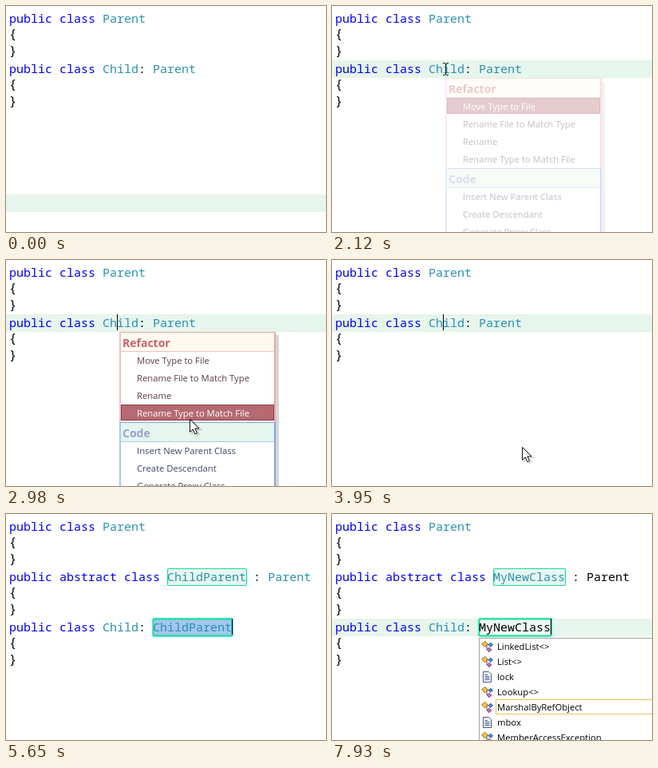
An HTML page that plays this animation: 401x283 px, repeating every 8 s.

```html
<!DOCTYPE html>
<html lang="en">
<head>
<meta charset="utf-8">
<title>Rename after refactoring</title>
<style>
  html, body { margin: 0; width: 100%; height: 100%; overflow: hidden; background: #fff; }
  svg { display: block; width: 401px; height: 283px; }
  text { white-space: pre; }
  .code { font: 15px "Noto Sans Mono", "DejaVu Sans Mono", monospace; }
  .brace { font: 500 15.5px "Noto Sans Mono", "DejaVu Sans Mono", monospace; }
  .ui { font: 11.25px "Open Sans", "Noto Sans", sans-serif; }
  .head { font: bold 14px "Open Sans", "Noto Sans", sans-serif; }
</style>
</head>
<body>
<svg id="stage" viewBox="0 0 401 283"></svg>
<script>
const LOOP = 8000, STEP = 60, LINE = 21, CHAR = 9, LEFT = 4;
const KEYWORD = '#0000f0', TYPE = '#2b91af', GREEN = '#14dca0';
const BAND = '#e6f5ed', BAND_EDGE = '#e4f6e2';
const stage = document.getElementById('stage');

// Helpers
const rect = (x, y, w, h, fill, more = '') =>
  `<rect x="${x}" y="${y}" width="${w}" height="${h}" fill="${fill}" ${more}/>`;
const label = (cls, x, y, fill, str) =>
  `<text class="${cls}" x="${x}" y="${y}" fill="${fill}">${str}</text>`;
const path = (d, more) => `<path d="${d}" ${more}/>`;
const at = (x, y, body) => `<g transform="translate(${x} ${y})">${body}</g>`;
const span = (fill, str) => `<tspan fill="${fill}">${str}</tspan>`;
const within = (t, a, b) => t >= a && t < b;
const snap = (t, start) => start + Math.floor((t - start) / STEP) * STEP;

// Keywords are coloured by word, type names are written in backticks.
function codeLine(row, str) {
  const marked = str
    .replace(/\b(public|abstract|class)\b/g, span(KEYWORD, '$1'))
    .replace(/`(\w+)`/g, span(TYPE, '$1'));
  return label('code', LEFT, LINE * (row + 1), '#000', marked);
}

// A class declaration with its empty body
const classBlock = (row, str) => codeLine(row, str) +
  ['{', '}'].map((c, i) => label('brace', LEFT, LINE * (row + i + 2) - 1, '#000', c)).join('');

function band(row) {
  const y = 5 + LINE * row;
  return rect(0, y, 401, 22, BAND_EDGE) + rect(0, y + 1, 401, 20, BAND);
}
const caret = (x, row) => rect(x, 5 + LINE * row, 1, 20, '#000');

// Position on a list of [time, x, y] points
function follow(points, t) {
  const i = points.findIndex(p => p[0] > t);
  if (i < 0) return points[points.length - 1].slice(1);
  if (i === 0) return points[0].slice(1);
  const a = points[i - 1], b = points[i];
  const k = (t - a[0]) / (b[0] - a[0]);
  return [1, 2].map(n => Math.round(a[n] + (b[n] - a[n]) * k));
}

// Mouse
const ARROW = 'M.5 .5V16.5L4.3 12.9L6.8 18.8L9.4 17.7L6.9 12H12z';
const arrow = (x, y) => at(x, y,
  at(2.5, 1.5, path(ARROW, 'fill="#000" opacity=".13" stroke="#000" stroke-width="2"')) +
  path(ARROW, 'fill="#fff" stroke="#111"'));
const beam = (x, y) => at(x, y, path('M-3 -7.5H-1L.5 -6.5L2 -7.5H4M.5 -7V7M-3 7.5H-1L.5 6.5L2 7.5H4',
  'fill="none" stroke="#111"'));

const APPROACH = [[400, 300, 246], [700, 238, 168], [940, 158, 92], [1060, 142, 79]];
const PICK = [[2380, 142, 79], [2620, 219, 140], [2920, 228, 190], [3220, 238, 233], [3290, 238, 234]];
const pickPoint = t => follow(PICK, t >= 3290 ? t : snap(t, 2440));

function mouse(t) {
  if (t < 460 || t >= 4210) return '';
  if (t < 1120) return beam(...follow(APPROACH, snap(t, 460)));
  const [x, y] = pickPoint(t);
  return y > 90 ? arrow(x, y) : beam(x, y);
}

// Refactoring menu
const SECTIONS = [
  { title: 'Refactor', top: 90, height: 114, line: '#f2c2be', side: '#e8a8a6', bar: '#fffaf0',
    head: '#c96466', ink: '#5c3c40', hot: '#b56a71', edge: '#8a3c48',
    items: ['Move Type to File', 'Rename File to Match Type', 'Rename', 'Rename Type to Match File'] },
  { title: 'Code', top: 203, height: 114, line: '#a8c8f0', side: '#86a4e0', bar: '#e6f5ed',
    head: '#93a4d2', ink: '#3e4866', hot: '#6f8fc8', edge: '#3f5c98',
    items: ['Insert New Parent Class', 'Create Descendant', 'Generate Proxy Class'] }
];

function menu(t) {
  if (!within(t, 2120, 3950)) return '';
  const y = pickPoint(t)[1];
  const rows = SECTIONS.flatMap(s => s.items.map((name, i) => ({ s, name, top: s.top + 25 + 22 * i })));
  const hot = rows.filter(r => r.top <= y).pop() || rows[0];
  let out = rect(146, 94, 196, 200, '#000', 'opacity=".16"');
  for (const s of SECTIONS) {
    out += rect(142, s.top, 196, s.height, '#fff') +
      rect(144, s.top + 1, 192, 23, s.bar) +
      rect(142, s.top, 196, 1, s.side) +
      rect(142, s.top, 2, s.height, s.line) +
      rect(336, s.top, 2, s.height, s.side) +
      rect(144, s.top + 24, 192, 1, s.line) +
      label('head', 146, s.top + 19, s.head, s.title);
  }
  for (const r of rows) {
    if (r === hot) out += rect(144.5, r.top + .5, 191, 19, r.s.hot, `stroke="${r.s.edge}"`);
    out += label('ui', 164, r.top + 15, r === hot ? '#fff' : r.s.ink, r.name);
  }
  const fade = Math.min(1, (1 + Math.floor((t - 2120) / STEP)) / 3);
  return `<g opacity="${fade}">${out}</g>`;
}

// Completion list
const diamond = (x, y, r, fill, edge) =>
  path(`M${x - r} ${y}L${x} ${y - r}L${x + r} ${y}L${x} ${y + r}z`, `fill="${fill}" stroke="${edge}"`);
const classIcon = path('M6 5.5H11M7 6V11.5H9', 'fill="none" stroke="#444"') +
  diamond(4.5, 5, 3.8, '#f4c444', '#9a6a10') +
  diamond(11.8, 5.8, 2.6, '#4c8cec', '#1c489c') +
  diamond(10, 12, 2.7, '#d070c8', '#802c80');
const pageIcon = path('M2.5 1.5H9.5L12.5 4.5V14.5H2.5z', 'fill="#f4f8ff" stroke="#4c5c74"') +
  path('M4.5 5.5H8M4.5 7.5H10.5M4.5 9.5H10.5M4.5 11.5H10.5', 'fill="none" stroke="#3c5c94"');
const WORDS = ['LinkedList&lt;&gt;', 'List&lt;&gt;', 'lock', 'Lookup&lt;&gt;',
  'MarshalByRefObject', 'mbox', 'MemberAccessException'];

function completion() {
  let out = rect(184.5, 155.5, 240, 140, '#fff', 'stroke="#a0a0a0"');
  WORDS.forEach((word, i) => {
    const mid = 166 + 19 * i;
    const icon = /^[a-z]/.test(word) ? pageIcon : classIcon;
    out += at(187, mid - 8, icon) + label('ui', 207, mid + 4, '#000', word);
  });
  return out + rect(205.5, 232.5, 220, 18, 'none', 'stroke="#e8c060"');
}

// Linked name fields
function field(x, row, length, active, fill) {
  const box = (paint, width, opacity) =>
    rect(x + .5, 5.5 + LINE * row, length * CHAR, 21, paint,
      `rx="1.5" stroke="${GREEN}" stroke-width="${width}" stroke-opacity="${opacity}"`);
  return (active ? box('none', 4, .3) : '') + box(fill, active ? 1.8 : 1.2, 1);
}

// Time at which each letter is typed
const TYPED = [6450, 6510, 6700, 6960, 7020, 7220, 7680, 7740, 7870, 7930];
const NEW_NAME = 'MyNewClass';

function before(t) {
  const row = t < 1120 ? 11 : 3;
  const on = within(t, 1120, 2120) || within(t, 2690, 3220) || t >= 3750;
  return band(row) + classBlock(3, 'public class `Child`: `Parent`') + (on ? caret(139, 3) : '');
}

function after(t) {
  const count = TYPED.filter(time => time <= t).length;
  const typing = count > 0;
  const name = typing ? NEW_NAME.slice(0, count) : 'ChildParent';
  const base = typing ? 'Parent' : '`Parent`';
  const used = t < 7220 ? '`' + name + '`' : name;
  const linked = t >= 4330;
  let out = linked && !typing ? '' : band(6);
  if (linked)
    out += field(202, 3, name.length, false, '#e8f6ef') +
      field(184, 6, name.length, true, typing ? '#eef8f3' : '#a3c6ee');
  out += classBlock(3, 'public abstract class `' + name + '` : ' + base) +
    classBlock(6, 'public class `Child`: ' + used);
  if (linked && !within(t, 5120, 5650)) out += caret(184 + name.length * CHAR, 6);
  return out + (t >= 6510 ? completion() : '');
}

let shown = '';
function draw(t) {
  const picture = rect(0, 0, 401, 283, '#fff') + (t < 4210 ? before(t) : after(t)) +
    classBlock(0, 'public class `Parent`') + menu(t) + mouse(t);
  if (picture !== shown) stage.innerHTML = shown = picture;
}

const start = performance.now();
function tick() {
  draw((performance.now() - start) % LOOP);
  requestAnimationFrame(tick);
}
draw(0);
requestAnimationFrame(tick);
</script>
</body>
</html>
```
